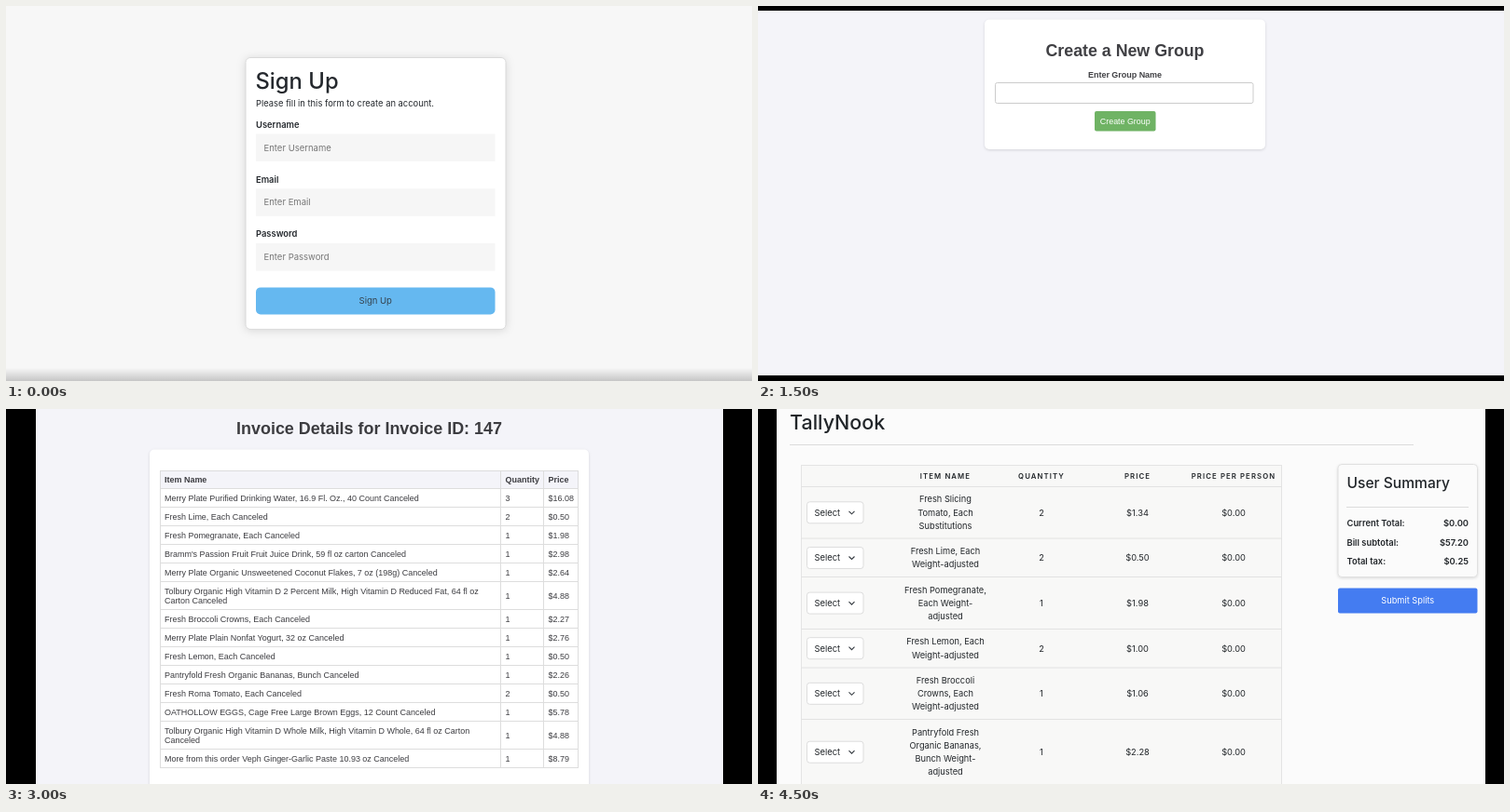
An HTML page that plays this animation: 800 by 403 pixels, repeating every 5 s.

```html
<!DOCTYPE html>
<html lang="en">
<head>
<meta charset="utf-8">
<title>Bill splitting walkthrough</title>
<style>
  html, body { margin: 0; width: 100%; height: 100%; overflow: hidden; background: #000; }
  svg { display: block; width: 100%; height: 100%; }
  .arial { font-family: "Liberation Sans", Arial, sans-serif; }
  .inter { font-family: Inter, sans-serif; }
  .soft { filter: drop-shadow(0 1px 1.5px rgba(0, 0, 0, .13)); }
  .raised { filter: drop-shadow(0 4px 4px rgba(0, 0, 0, .22)); }
  .wide { filter: drop-shadow(0 1px 5px rgba(0, 0, 0, .13)); }
</style>
</head>
<body>
<svg id="stage" viewBox="0 0 800 403">
  <defs>
    <linearGradient id="edge" x2="0" y2="1">
      <stop stop-color="#000" stop-opacity="0"/>
      <stop offset="1" stop-color="#000" stop-opacity=".2"/>
    </linearGradient>
  </defs>
</svg>
<script>
const SCENE_MS = 500;
const GREEN = '#5fae5b', RED = '#e4523e', PALE = '#f4f4f9', GRID = '#ddd';

const box = (x1, y1, x2, y2, fill, { r = 0, stroke = 'none', cls = '' } = {}) =>
  `<rect x="${x1}" y="${y1}" width="${x2 - x1}" height="${y2 - y1}" rx="${r}" fill="${fill}" stroke="${stroke}" class="${cls}"/>`;

const text = (str, x, y, size, { weight = 400, fill = 'inherit', anchor = 'start', spacing = 0 } = {}) =>
  `<text x="${x}" y="${y}" font-size="${size}" font-weight="${weight}" style="fill:${fill}" text-anchor="${anchor}" letter-spacing="${spacing}">${str}</text>`;

const mid = (str, x, y, size, opts) => text(str, x, y, size, { anchor: 'middle', ...opts });

const line = (x1, y1, x2, y2, color = GRID) =>
  `<path d="M${x1} ${y1}L${x2} ${y2}" stroke="${color}" fill="none"/>`;

const hLines = (x1, x2, ys, color) => ys.map(y => line(x1, y, x2, y, color)).join('');
const vLines = (y1, y2, xs, color) => xs.map(x => line(x, y1, x, y2, color)).join('');

// Lines of text centred vertically on cy
const block = (lines, x, cy, size, leading, opts) =>
  lines.map((s, i) => text(s, x, cy + size * .36 + (i - (lines.length - 1) / 2) * leading, size, opts)).join('');

const button = (label, x1, y1, x2, y2, size, fill, opts = {}) =>
  box(x1, y1, x2, y2, fill, { r: 3, ...opts }) +
  mid(label, (x1 + x2) / 2, (y1 + y2) / 2 + size * .35, size, { fill: '#fff', ...opts.text });

// A page shown through a window, black outside it
const page = (font, bg, color, [x1, y1, x2, y2], content) =>
  `<g class="${font}" fill="${color}">${box(x1, y1, x2, y2, bg)}${content}` +
  `<path fill="#000" fill-rule="evenodd" d="M0 0H800V403H0ZM${x1} ${y1}V${y2}H${x2}V${y1}Z"/></g>`;

function accountForm(title, intro, fields, bg) {
  const end = 138 + fields.length * 58.8 - 12;
  const inputs = fields.map((name, i) => {
    const y = 137.5 + i * 58.8;
    return text(name, 268, y - 6.7, 9.4, { weight: 600 }) +
      box(268, y, 524.5, y + 29.5, '#f6f6f6') +
      text('Enter ' + name, 276.5, y + 18, 9.5, { fill: '#777' });
  }).join('');
  return page('inter', bg, '#24282d', [0, 0, 800, 403],
    box(257, 55.5, 536, end + 45, '#fff', { r: 5, stroke: '#d9d9d9', cls: 'wide' }) +
    text(title, 267.5, 88.5, 23.8, { weight: 500 }) + text(intro, 268, 108, 9.4) + inputs +
    button('Sign Up'.replace('Sign Up', title), 268, end, 524.5, end + 29, 9.5, '#65b8f0', { r: 5, text: { fill: '#35434e' } }) +
    box(0, 389, 800, 403, 'url(#edge)'));
}

function billSummary() {
  const cols = [193, 299, 405, 511];
  const rows = [
    [184.5, ['Merry Plate Purified', 'Drinking Water, 16.9 Fl.', 'Oz., 40 Count', 'Canceled'], '$16.08', '1 people', '$16.08'],
    [238.2, ['Fresh Lime, Each', 'Canceled'], '$0.50', '2 people', '$0.25'],
    [298.5, ['Tolbury Organic High', 'Vitamin D 2 Percent', 'Milk, High Vitamin D', 'Reduced Fat, 64 fl oz', 'Carton Canceled'], '$4.88', '1 people', '$4.88'],
  ];
  const heads = ['ITEM', 'ORIGINAL PRICE', 'SPLIT BETWEEN', 'YOUR SHARE'];
  return page('inter', '#f4f4f4', '#212529', [0, 11, 800, 391],
    text('Bill Summary', 39, 31, 20.2, { weight: 600 }) + line(39, 45, 756, 45, '#d2d2d2') +
    box(177, 63.5, 619.5, 420, '#fafafa', { r: 5, stroke: '#e2e2e2' }) +
    text('Split Summary', 185, 89.2, 16.5, { weight: 500 }) +
    text("Evan's Share", 185, 112.5, 14.4, { weight: 500 }) +
    box(185.5, 125.5, 610, 337.5, '#f9f9f8', { stroke: '#ebebeb' }) +
    box(186, 126, 609.5, 151, '#f7f8fa') +
    hLines(186, 610, [151, 217.5, 258], '#ebebeb') +
    heads.map((h, i) => text(h, cols[i], 140.6, 7, { weight: 600, spacing: 1 })).join('') +
    rows.map(([cy, ...cells]) => cells.map((c, i) => block([].concat(c), cols[i], cy, 8.4, 13.35)).join('')).join('') +
    box(185.5, 348, 610, 378, '#f7f8fa') +
    text('Total to Pay', 194.5, 366.3, 8.5, { weight: 600 }) +
    text('$21.21', 602, 366.3, 8.5, { weight: 600, anchor: 'end' }));
}

function groupForm(title, label, action, top, bottom) {
  return page('arial', PALE, '#404044', [0, top, 800, bottom],
    box(243, 14.5, 544, 154, '#fff', { r: 5, cls: 'soft' }) +
    mid(title, 393.5, 53.5, 17.8, { weight: 700 }) +
    mid(label, 393.5, 77, 8.95, { weight: 700 }) +
    box(254.5, 82.5, 531, 104.5, '#fff', { r: 2, stroke: '#ccc' }) +
    button(action, 361, 113, 426.5, 134.5, 8.9, '#6fb364', { r: 2 }));
}

function groups() {
  const link = (label, x1, y1, x2, y2, cls = 'soft') =>
    button(label, x1, y1, x2, y2, 9.85, '#e9f0fe', { r: 4, stroke: '#d3def2', cls, text: { fill: '#2f4582', weight: 700 } });
  const bold = { weight: 700 };
  return page('arial', PALE, '#3b3b3f', [0, 22, 800, 380],
    mid('Your Groups', 399.5, 45.3, 17.3, bold) +
    box(8, 72, 144.5, 143, '#fff', { r: 4, stroke: '#e6e6ea', cls: 'soft' }) +
    mid('Need to create a new', 76, 87.6, 10.25, bold) + mid('group?', 76, 99.5, 10.25, bold) +
    link('Click here!', 13.5, 108, 139, 137.5) +
    link('Group Name: test1', 241, 80.5, 395.5, 109.5, 'raised') +
    link('Group Name: test2', 404, 83.5, 558, 112) +
    box(655, 72, 791.5, 131.5, '#fff', { r: 4, stroke: '#e6e6ea', cls: 'soft' }) +
    mid('Join to a existing group', 723.2, 87.6, 10.25, bold) +
    link('Click here!', 660.5, 96, 786, 126));
}

function invoiceDetails() {
  const items = [
    ['Merry Plate Purified Drinking Water, 16.9 Fl. Oz., 40 Count Canceled', 3, '16.08'],
    ['Fresh Lime, Each Canceled', 2, '0.50'],
    ['Fresh Pomegranate, Each Canceled', 1, '1.98'],
    ["Bramm's Passion Fruit Fruit Juice Drink, 59 fl oz carton Canceled", 1, '2.98'],
    ['Merry Plate Organic Unsweetened Coconut Flakes, 7 oz (198g) Canceled', 1, '2.64'],
    ['Tolbury Organic High Vitamin D 2 Percent Milk, High Vitamin D Reduced Fat, 64 fl oz|Carton Canceled', 1, '4.88'],
    ['Fresh Broccoli Crowns, Each Canceled', 1, '2.27'],
    ['Merry Plate Plain Nonfat Yogurt, 32 oz Canceled', 1, '2.76'],
    ['Fresh Lemon, Each Canceled', 1, '0.50'],
    ['Pantryfold Fresh Organic Bananas, Bunch Canceled', 1, '2.26'],
    ['Fresh Roma Tomato, Each Canceled', 2, '0.50'],
    ['OATHOLLOW EGGS, Cage Free Large Brown Eggs, 12 Count Canceled', 1, '5.78'],
    ['Tolbury Organic High Vitamin D Whole Milk, High Vitamin D Whole, 64 fl oz Carton|Canceled', 1, '4.88'],
    ['More from this order Veph Ginger-Garlic Paste 10.93 oz Canceled', 1, '8.79'],
  ];
  const cols = [170, 535.5, 581.5];
  const row = (cells, cy, opts) => cells.map((c, i) => block(String(c).split('|'), cols[i], cy, 8.97, 10.3, opts)).join('');
  let y = 86, body = '';
  for (const [name, quantity, price] of items) {
    const height = name.includes('|') ? 30 : 20;
    body += row([name, quantity, '$' + price], y + height / 2) + line(165, y + height - .5, 614, y + height - .5);
    y += height;
  }
  return page('arial', PALE, '#3c3c40', [32, 0, 769, 403],
    mid('Invoice Details for Invoice ID: 147', 389.5, 27.2, 17.93, { weight: 700 }) +
    box(154, 43.5, 625, 420, '#fff', { r: 5, cls: 'soft' }) +
    box(165.5, 66.5, 613.5, 85.5, PALE, { stroke: GRID }) +
    row(['Item Name', 'Quantity', 'Price'], 76, { weight: 700 }) + body +
    vLines(66, y, [165.5, 530.5, 576.5, 613.5]));
}

function invoices(file) {
  const cols = [276, 348, 469, 546, 597, 642];
  const bills = [
    ['142', '2000124-72816495', '2024-11-16', '$42.77', '$0.00'],
    ['143', '2000125-72275842', '2024-12-05', '$57.20', '$0.25'],
    ['144', '2000126-06761699', '2024-12-05', '$0.00', '$0.00'],
  ];
  const row = (cells, y, opts) => cells.map((c, i) => text(c, cols[i], y, 11.36, opts)).join('');
  return mid('Invoices for Group 2', 434.5, 31.5, 22.7, { weight: 700 }) +
    box(91, 53, 240.5, 135.5, '#fff', { r: 5, stroke: '#e0e0e8', cls: 'soft' }) +
    mid('Upload new bill', 165.5, 72.2, 13.2, { weight: 700, fill: '#2c2c30' }) +
    line(98, 82.5, 232, 82.5, '#eee') +
    button('Choose File', 98.5, 84, 160, 98.5, 9.5, '#efefef', { r: 2, stroke: '#777', text: { fill: '#111' } }) +
    text(file, 163, 94.4, 9.45) +
    button('Upload and Process', 115, 102.5, 216.5, 125, 9.45, GREEN) +
    box(248, 52, 780, 362, '#fff', { r: 5, cls: 'soft' }) +
    box(269.5, 88, 743, 113, PALE) +
    hLines(269, 743, [88, 113, 184, 255, 325.5]) +
    vLines(88, 326, [269.5, 341.5, 463, 540, 591, 635.5, 742.5]) +
    row(['Invoice ID', 'Order Number', 'Date', 'Total', 'Tax', 'Actions'], 104.5, { weight: 700 }) +
    bills.map((bill, i) => {
      const y = i * 71;
      return row(bill, y + 152.2) +
        button('Bill Summary', 645, y + 123, 718, y + 145, 9.47, GREEN) +
        button('Split Summary', 645, y + 152, 723.5, y + 174.5, 9.47, RED);
    }).join('');
}

function splitPage() {
  const cols = [201, 304, 407, 510];
  const items = [
    [111.3, 'Fresh Slicing|Tomato, Each|Substitutions', 2, '$1.34'],
    [160, 'Fresh Lime, Each|Weight-adjusted', 2, '$0.50'],
    [208.6, 'Fresh Pomegranate,|Each Weight-|adjusted', 1, '$1.98'],
    [257.2, 'Fresh Lemon, Each|Weight-adjusted', 2, '$1.00'],
    [305.8, 'Fresh Broccoli|Crowns, Each|Weight-adjusted', 1, '$1.06'],
    [368.7, 'Pantryfold Fresh|Organic Bananas,|Bunch Weight-|adjusted', 1, '$2.28'],
  ];
  const totals = [['Current Total:', '$0.00'], ['Bill subtotal:', '$57.20'], ['Total tax:', '$0.25']];
  const select = cy => box(52.5, cy - 11.5, 113, cy + 11.5, '#fff', { r: 3, stroke: GRID }) +
    text('Select', 60.5, cy + 3.3, 9.4) +
    `<path d="M97.5 ${cy - 1.5}l3 3l3-3" fill="none" stroke="#343a40" stroke-width="1.1"/>`;
  return page('inter', '#fbfbfb', '#212529', [20, 0, 780, 403],
    text('TallyNook', 34, 22.3, 21.5, { weight: 500 }) + line(34, 38.5, 703, 38.5, '#dcdcdc') +
    box(46.5, 60.5, 561.5, 420, '#f8f8f7', { stroke: '#e4e4e4' }) +
    hLines(46, 562, [83.5, 139, 180.5, 236.5, 278, 333.5], '#e2e2e2') +
    ['ITEM NAME', 'QUANTITY', 'PRICE', 'PRICE PER PERSON'].map((h, i) =>
      mid(h, cols[i], 74.6, 7.75, { weight: 600, spacing: 1.1 })).join('') +
    items.map(([cy, ...cells]) => select(cy) + [...cells, '$0.00'].map((c, i) =>
      block(String(c).split('|'), cols[i], cy, 9.25, 14.3, { anchor: 'middle' })).join('')).join('') +
    box(622, 59.5, 771.5, 180.5, '#fbfbfb', { r: 4, stroke: '#e0e0e0', cls: 'soft' }) +
    text('User Summary', 631.5, 85.3, 15.6, { weight: 500 }) + line(631, 105.5, 762, 105.5, '#dcdcdc') +
    totals.map(([label, value], i) => {
      const y = 126.2 + i * 20.4;
      return text(label, 631.5, y, 9.35, { weight: 600 }) + text(value, 762, y, 9.35, { weight: 600, anchor: 'end' });
    }).join('') +
    button('Submit Splits', 622, 192.5, 771.5, 219.5, 9.25, '#447cf1', { r: 2 }));
}

const invoicePage = (left, right, file) => {
  const scale = (right - left) / 728;
  return page('arial', PALE, '#404044', [left, 0, right, 403],
    `<g transform="translate(${left}) scale(${scale}) translate(-36)">${invoices(file)}</g>`);
};

const scenes = [
  accountForm('Sign Up', 'Please fill in this form to create an account.', ['Username', 'Email', 'Password'], '#f7f7f7'),
  accountForm('Login', 'Please fill in this form to log in.', ['Username', 'Password'], '#f5f5f5'),
  billSummary(),
  groupForm('Create a New Group', 'Enter Group Name', 'Create Group', 5, 397),
  groupForm('Join an Existing Group', 'Enter Group Code', 'Join Group', 7, 396),
  groups(),
  invoiceDetails(),
  invoicePage(28, 773, 'No file chosen'),
  invoicePage(36, 764, 'walmart1.pdf'),
  splitPage(),
];

const stage = document.getElementById('stage');
stage.insertAdjacentHTML('beforeend', scenes.map(s => `<g class="scene" display="none">${s}</g>`).join(''));
const layers = [...stage.querySelectorAll('.scene')];

function render(now) {
  const current = Math.floor(now / SCENE_MS) % layers.length;
  layers.forEach((layer, i) => layer.setAttribute('display', i === current ? 'inline' : 'none'));
}

const start = performance.now();
function tick() {
  render(performance.now() - start);
  requestAnimationFrame(tick);
}
tick();
</script>
</body>
</html>
```
